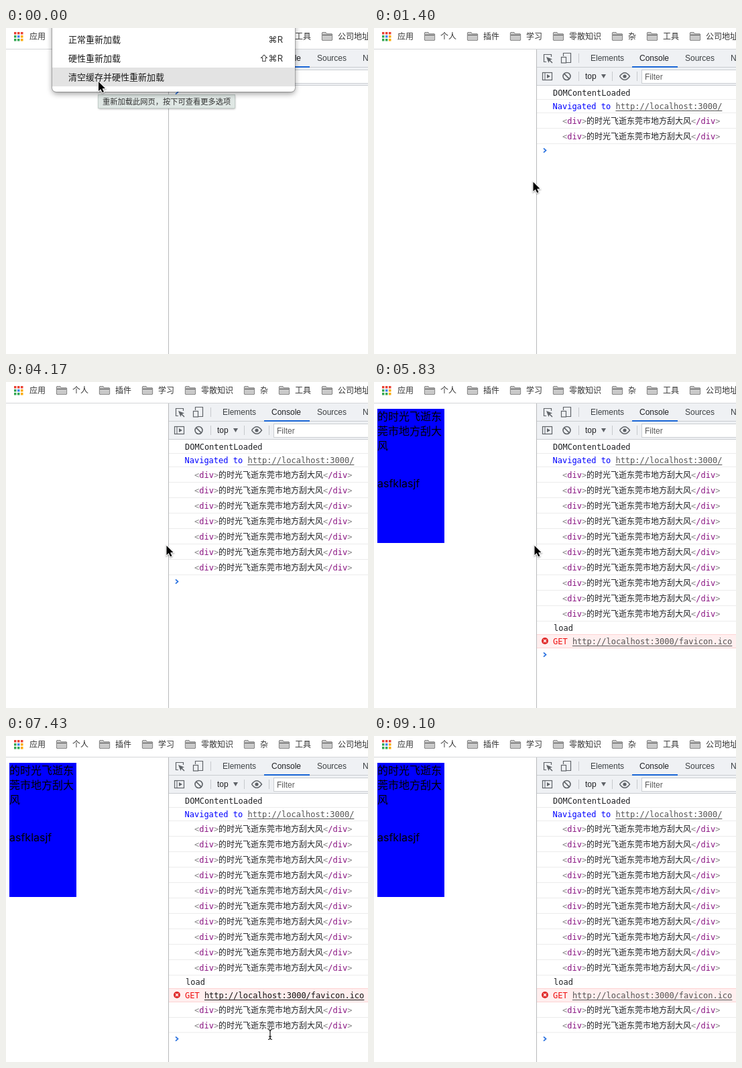
These frames come from a looping animation (540x486 px, 9130 ms). An HTML page with a canvas:

```html
<!DOCTYPE html>
<html lang="zh-CN">
<head>
<meta charset="utf-8">
<style>
html, body { margin: 0; width: 100%; height: 100%; overflow: hidden; background: #fff; }
canvas { display: block; }
</style>
</head>
<body>
<canvas id="stage" width="540" height="486"></canvas>
<script>
const ctx = document.getElementById('stage').getContext('2d');
const LOOP = 9130;
const CJK = '"Noto Sans CJK SC", "Noto Sans CJK", sans-serif';
const UI = '"Liberation Sans", ' + CJK;
const MONO = '"DejaVu Sans Mono", "Noto Sans CJK SC", monospace';
const PHRASE = '的时光飞逝东莞市地方刮大风';

// Event times in ms
const MENU_FADE = 200, MENU_GONE = 330, READY = 365, NAVIGATED = 400;
const FIRST_LOG = 860, LOG_STEP = 500, LOADED = 5380;

// Pointer stops: time, x, y
const POINTER = [
  [0, 137, 79], [330, 137, 79], [900, 236.5, 228.5], [2200, 236.5, 228.5],
  [2600, 239.5, 239], [2750, 239.5, 239], [3050, 238.5, 243], [6900, 238.5, 243],
  [7390, 394, 445], [7500, 394, 445], [7740, 565, 415]
];

function rect(x, y, w, h, color) {
  ctx.fillStyle = color;
  ctx.fillRect(x, y, w, h);
}

function text(str, x, y, color, font, align = 'left') {
  ctx.font = font;
  ctx.fillStyle = color;
  ctx.textAlign = align;
  ctx.fillText(str, x, y);
}

function mono(str, x, y, color) {
  text(str, x, y, color, '12px ' + MONO);
  return x + ctx.measureText(str).width;
}

function line(points, color, width = 1) {
  ctx.beginPath();
  points.forEach(([x, y]) => ctx.lineTo(x, y));
  ctx.strokeStyle = color;
  ctx.lineWidth = width;
  ctx.stroke();
}

function polygon(points, fill, stroke, width = 1) {
  ctx.beginPath();
  points.forEach(([x, y]) => ctx.lineTo(x, y));
  ctx.closePath();
  ctx.lineWidth = width;
  if (stroke) { ctx.strokeStyle = stroke; ctx.stroke(); }
  if (fill) { ctx.fillStyle = fill; ctx.fill(); }
}

function disc(x, y, r, color) {
  ctx.beginPath();
  ctx.arc(x, y, r, 0, Math.PI * 2);
  ctx.fillStyle = color;
  ctx.fill();
}

function ring(x, y, r, color, width) {
  ctx.beginPath();
  ctx.arc(x, y, r, 0, Math.PI * 2);
  ctx.strokeStyle = color;
  ctx.lineWidth = width;
  ctx.stroke();
}

function folder(x) {
  polygon([[x + .5, 17.5], [x + .5, 8], [x + 1.5, 6.5], [x + 5.5, 6.5], [x + 7, 8.5],
    [x + 14, 8.5], [x + 15.5, 9.5], [x + 15.5, 17.5], [x + 14.5, 18.5], [x + 1.5, 18.5]], '#c9c9c9', '#505050', 1.2);
  rect(x + 1, 10, 14, 1, '#505050');
}

function bookmarks() {
  const colors = ['#ea4335', '#ea4335', '#ea4335', '#34a853', '#4285f4', '#fbab05', '#34a853', '#34a853', '#fbab05'];
  colors.forEach((c, i) => rect(12 + i % 3 * 5, 6 + Math.floor(i / 3) * 5, 3.5, 3.5, c));
  const font = '12px ' + CJK;
  text('应用', 35, 17, '#333', font);
  const labels = { 75: '个人', 139: '插件', 203: '学习', 267: '零散知识', 355: '杂', 407: '工具', 471: '公司地址' };
  for (const x in labels) {
    folder(+x);
    text(labels[x], +x + 24, 17, '#333', font);
  }
  rect(0, 31, 540, 1, '#d4d6d8');
}

function toolbar() {
  const grey = '#5f6368';
  rect(242, 32, 1, 454, '#b8babc');
  rect(243, 32, 297, 53, '#eff1f4');
  rect(243, 58, 297, 1, '#cacdd1');
  rect(243, 85, 297, 1, '#cacdd1');
  rect(385, 57, 68, 2, '#1a66d6');

  // Inspect and device icons
  line([[257, 50.5], [253.5, 50.5], [253.5, 39.5], [264.5, 39.5], [264.5, 43]], grey, 1.2);
  polygon([[257, 43], [266, 46.5], [262, 48], [260.5, 52]], grey);
  line([[261, 47], [266, 52]], grey, 1.5);
  line([[282.5, 42], [282.5, 37.5], [293.5, 37.5], [293.5, 51.5], [287, 51.5]], grey, 1.2);
  ctx.strokeRect(279.5, 43.5, 7, 8.5);
  rect(305, 38, 1, 14, '#c6c9cd');

  const font = '12px ' + UI;
  text('Elements', 323, 49, '#3c4043', font);
  text('Console', 396, 49, '#202124', font);
  text('Sources', 464, 49, '#3c4043', font);
  text('Network', 532, 49, '#3c4043', font);

  // Sidebar, clear and eye icons
  ctx.lineWidth = 1.2;
  ctx.strokeStyle = grey;
  ctx.strokeRect(251.5, 66.5, 14, 11);
  rect(254.5, 67, 1, 11, grey);
  polygon([[258, 69], [263, 72], [258, 75]], grey);
  ring(287.5, 72, 5.5, grey, 1.6);
  line([[283.6, 68.1], [291.4, 75.9]], grey, 1.6);
  [305, 355, 392].forEach(x => rect(x, 65, 1, 14, '#c6c9cd'));
  text('top', 315, 76, '#202124', font);
  polygon([[339, 69], [346, 69], [342.5, 75]], grey);
  ctx.beginPath();
  ctx.moveTo(366.5, 72);
  ctx.quadraticCurveTo(374, 61.5, 381.5, 72);
  ctx.quadraticCurveTo(374, 82.5, 366.5, 72);
  ctx.lineWidth = 1.4;
  ctx.stroke();
  disc(374, 72, 2.6, grey);

  rect(399, 62, 150, 21, '#cbced2');
  rect(400, 63, 150, 19, '#fff');
  text('Filter', 404, 77, '#5a5a5a', font);
}

function link(str, x, y, color) {
  const end = mono(str, x, y, color);
  rect(x, y + 2, end - x, 1, color);
}

function elementRow(y) {
  const parts = [['<', '#888'], ['div', '#881280'], ['>', '#888'], [PHRASE, '#202124'],
    ['<', '#888'], ['/div', '#881280'], ['>', '#888']];
  parts.reduce((x, [str, color]) => mono(str, x, y, color), 281);
}

function errorRow(top, hover) {
  rect(243, top, 297, 21, '#fdd3d3');
  rect(243, top + 1, 297, 19, '#ffefef');
  disc(255, top + 10, 5, '#e02a2a');
  line([[253, top + 8], [257, top + 12]], '#fff', 1.3);
  line([[257, top + 8], [253, top + 12]], '#fff', 1.3);
  mono('GET', 267, top + 15, '#f01010');
  link('http://localhost:3000/favicon.ico', 295.9, top + 15, hover ? '#111' : '#545454');
}

function consoleLog(t) {
  let top = 86;
  const row = (height, draw) => {
    draw(top);
    top += height;
    rect(243, top - 1, 297, 1, '#ececec');
  };
  const logs = t < FIRST_LOG ? 0 : Math.min(12, 1 + Math.floor((t - FIRST_LOG) / LOG_STEP));

  if (t >= READY) row(21, y => mono('DOMContentLoaded', 267, y + 15, '#202124'));
  if (t >= NAVIGATED) row(20, y => link('http://localhost:3000/', mono('Navigated to ', 266.5, y + 14, '#00f'), y + 14, '#545454'));
  for (let i = 0; i < Math.min(logs, 10); i++) row(23, y => elementRow(y + 16));
  if (t >= LOADED) {
    row(20, y => mono('load', 268, y + 14, '#202124'));
    errorRow(top - 1, t > 7300 && t < 7500);
    top += 20;
    for (let i = 10; i < logs; i++) row(i === 10 ? 23 : 22.5, y => elementRow(Math.round(y) + 16));
  }
  const y = Math.floor(top) + 9.5;
  line([[253, y - 3.2], [256.5, y], [253, y + 3.2]], '#2a72e0', 1.7);
}

function page() {
  rect(5, 40, 100, 200, '#00f');
  [0, 6, 12].forEach((start, i) =>
    text(PHRASE.slice(start, start + 6), 5, 57 + i * 22, '#000', '16px ' + CJK));
  text('asfklasjf', 5, 157, '#000', '16px Inter, sans-serif');
}

function panel(x, y, w, h, r, color, blur, drop) {
  ctx.save();
  ctx.shadowColor = 'rgba(0,0,0,.4)';
  ctx.shadowBlur = blur;
  ctx.shadowOffsetY = drop;
  ctx.beginPath();
  ctx.roundRect(x, y, w, h, r);
  ctx.fillStyle = color;
  ctx.fill();
  ctx.restore();
}

function menu(alpha) {
  ctx.globalAlpha = alpha;
  panel(137.5, 99.5, 204, 20, 0, '#dfe7e4', 3, 1);
  ctx.strokeStyle = '#c3cdc9';
  ctx.lineWidth = 1;
  ctx.strokeRect(137.5, 99.5, 204, 20);
  text('重新加载此网页，按下可查看更多选项', 144, 113.5, '#333', '11.25px ' + CJK);

  panel(69, -20, 362, 115, 6, '#fff', 9, 3);
  ctx.beginPath();
  ctx.roundRect(68.5, -20, 363, 115.5, 6);
  ctx.strokeStyle = 'rgba(0,0,0,.22)';
  ctx.stroke();
  rect(69, 59, 362, 28, '#e3e3e3');
  const items = [['正常重新加载', '⌘R'], ['硬性重新加载', '⇧⌘R'], ['清空缓存并硬性重新加载', '']];
  items.forEach(([label, keys], i) => {
    const y = 22 + i * 28;
    text(label, 93, y, '#1c1c1c', '13px ' + CJK);
    text(keys, 413, y, '#333', '13px Inter, "DejaVu Sans", sans-serif', 'right');
  });
  ctx.globalAlpha = 1;
}

function pointerAt(t) {
  const next = POINTER.findIndex(stop => stop[0] > t);
  if (next < 0) return POINTER[POINTER.length - 1].slice(1);
  const [t0, x0, y0] = POINTER[next - 1], [t1, x1, y1] = POINTER[next];
  const k = (t - t0) / (t1 - t0), e = k * k * (3 - 2 * k);
  return [x0 + (x1 - x0) * e, y0 + (y1 - y0) * e];
}

function iBeam(x, y) {
  const strokes = [
    [[x - 3, y - 7.5], [x - 1, y - 7], [x, y - 5.5], [x + 1, y - 7], [x + 3, y - 7.5]],
    [[x, y - 6], [x, y + 6]],
    [[x - 3, y + 7.5], [x - 1, y + 7], [x, y + 5.5], [x + 1, y + 7], [x + 3, y + 7.5]],
    [[x - 2, y + 3], [x + 2, y + 3]]
  ];
  strokes.forEach(s => line(s, 'rgba(255,255,255,.8)', 2.6));
  strokes.forEach(s => line(s, '#111', 1.2));
}

function pointer(t) {
  const [x, y] = pointerAt(t);
  if (x > 243) return iBeam(x, y);
  const shape = [[0, 0], [0, 14], [3.2, 11], [5.7, 16.3], [8, 15.3], [5.6, 10.2], [10, 10]];
  ctx.save();
  ctx.translate(x + 1, y + 1);
  ctx.shadowColor = 'rgba(0,0,0,.4)';
  ctx.shadowBlur = 2;
  ctx.shadowOffsetY = 1;
  polygon(shape, null, '#fff', 2);
  ctx.restore();
  ctx.save();
  ctx.translate(x + 1, y + 1);
  polygon(shape, '#000');
  ctx.restore();
}

function draw(t) {
  rect(0, 0, 540, 486, '#fff');
  bookmarks();
  toolbar();
  consoleLog(t);
  if (t >= LOADED) page();
  if (t < MENU_GONE) menu(Math.min(1, (MENU_GONE - t) / (MENU_GONE - MENU_FADE)));
  pointer(t);
}

function tick() {
  draw(performance.now() % LOOP);
  requestAnimationFrame(tick);
}
tick();
</script>
</body>
</html>
```
